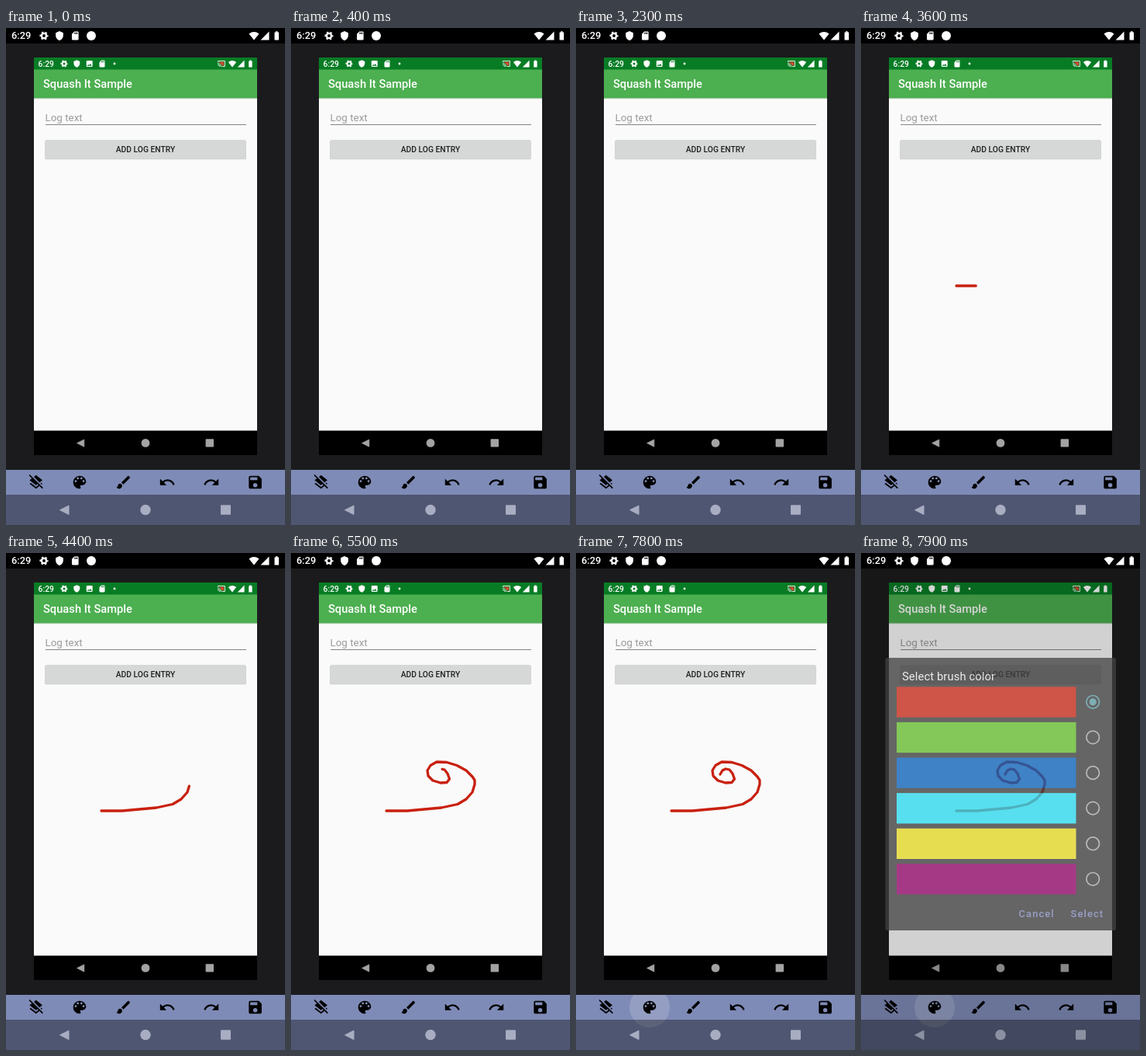
Recreate the animation shown at these times as an HTML page. Size 360 by 640 pixels, loop 8 s.

```html
<!DOCTYPE html>
<html lang="en">
<head>
<meta charset="utf-8">
<title>Drawing on a screenshot</title>
<style>
  html, body { margin: 0; width: 100%; height: 100%; overflow: hidden; background: #000; }
  svg { display: block; width: 360px; height: 640px; font-family: Roboto, "Noto Sans", sans-serif; }
  .medium { font-weight: 500; }
  #dialog .action { font-size: 12.85px; letter-spacing: 1.15px; fill: #878fc4; }
</style>
</head>
<body>
<svg viewBox="0 0 360 640">
  <defs>
    <g id="gear" fill="none" stroke="#fff">
      <circle cx="12" cy="12" r="5.8" stroke-width="4.6"/>
      <circle cx="12" cy="12" r="8.8" stroke-width="3" pathLength="12" stroke-dasharray="1" stroke-dashoffset=".5"/>
    </g>
    <path id="shield" d="M12 1L3 5v6c0 5.55 3.84 10.74 9 12 5.16-1.26 9-6.45 9-12V5z"/>
    <path id="card" d="M18 2h-8L4 8v12c0 1.1.9 2 2 2h12c1.1 0 2-.9 2-2V4c0-1.1-.9-2-2-2zm-6 6h-2V4h2zm3 0h-2V4h2zm3 0h-2V4h2z"/>
    <path id="image" d="M21 19V5c0-1.1-.9-2-2-2H5c-1.1 0-2 .9-2 2v14c0 1.1.9 2 2 2h14c1.1 0 2-.9 2-2zM8.500 13.500l2.500 3L14.500 12l4.500 6H5z"/>
    <g id="cast" fill="none" stroke="#fff" stroke-width="2">
      <path d="M2 8V4h20v16h-8M1 15a6 6 0 0 1 6 6M1 11a10 10 0 0 1 10 10"/>
      <path d="M5 7h14v10h-5.600A13 13 0 0 0 5 8.600z" fill="#e0452f" stroke="none"/>
    </g>

    <path id="clear" d="M19.810 14.990l1.190-.92-1.430-1.430-1.190.92zm-.45-4.720L21 9l-9-7-2.910 2.270 7.870 7.880zM3.270 1L2 2.270l4.220 4.220L3 9l1.630 1.270L12 16l2.100-1.630 1.430 1.430L12 18.540l-7.370-5.730L3 14.070l9 7 4.950-3.850L20.730 21 22 19.730z"/>
    <g id="palette">
      <path d="M12 3c-4.970 0-9 4.030-9 9s4.030 9 9 9c.83 0 1.500-.67 1.500-1.500 0-.39-.15-.74-.39-1-.23-.26-.38-.61-.38-1 0-.83.67-1.500 1.500-1.500H16c2.760 0 5-2.240 5-5 0-4.420-4.030-8-9-8z"/>
      <g fill="#8591ba">
        <circle cx="6.5" cy="10.5" r="1.5"/><circle cx="9.500" cy="6.5" r="1.5"/>
        <circle cx="14.5" cy="6.5" r="1.5"/><circle cx="17.5" cy="10.5" r="1.5"/>
      </g>
    </g>
    <path id="brush" d="M7 14c-1.660 0-3 1.340-3 3 0 1.310-1.160 2-2 2 .92 1.220 2.490 2 4 2 2.210 0 4-1.790 4-4 0-1.660-1.340-3-3-3zm13.710-9.370l-1.340-1.340c-.39-.39-1.020-.39-1.410 0L9 12.250 11.750 15l8.960-8.960c.39-.39.39-1.020 0-1.410z"/>
    <path id="undo" d="M12.500 8c-2.650 0-5.050.99-6.900 2.600L2 7v9h9l-3.620-3.620c1.390-1.160 3.160-1.880 5.120-1.880 3.540 0 6.550 2.310 7.600 5.500l2.370-.78C21.080 11.030 17.150 8 12.500 8z"/>
    <use id="redo" href="#undo" transform="matrix(-1 0 0 1 24 0)"/>
    <path id="save" d="M17 3H5c-1.110 0-2 .9-2 2v14c0 1.100.89 2 2 2h14c1.100 0 2-.9 2-2V7zm-5 16a3 3 0 1 1 0-6 3 3 0 0 1 0 6zm3-10H5V5h10z"/>

    <g id="status" fill="#fff">
      <text class="medium" x="7" y="14.4" font-size="12.85">6:29</text>
      <path d="M313.500 7.500Q320 2.600 326.500 7.500L320 15.500zM339.500 4.500v11h-11zM346.500 5.500h1.500v-1.200h2.500v1.200h1.500v10h-5.500z"/>
    </g>
    <g id="keys">
      <path d="M81 615v11.500L69.500 620.700z" stroke="currentColor" stroke-linejoin="round"/>
      <circle cx="180" cy="620.5" r="6.700"/>
      <rect x="277" y="614.2" width="13" height="12.600" rx="1"/>
    </g>
    <clipPath id="below"><rect y="569" width="360" height="71"/></clipPath>
  </defs>

  <rect y="20" width="360" height="549" fill="#1b1b1d"/>

  <rect x="36" y="38" width="288" height="512" fill="#fafafa"/>
  <rect x="36" y="38" width="288" height="16" fill="#087c25"/>
  <rect x="36" y="53.500" width="288" height="37" fill="#4caf50"/>
  <rect x="36" y="90.500" width="288" height="1" fill="#000" opacity=".1"/>
  <rect x="36" y="518.500" width="288" height="31.500" fill="#000"/>
  <g transform="translate(36 38) scale(.8)">
    <use href="#status"/>
    <use href="#keys" fill="#a3a3a3" color="#a3a3a3"/>
  </g>
  <circle cx="140" cy="46" r="1.4" fill="#fff"/>
  <text class="medium" x="48" y="77.300" font-size="14.7" fill="#fff">Squash It Sample</text>
  <text x="50.500" y="119.600" font-size="13.4" fill="#9b9b9b">Log text</text>
  <rect x="51" y="124" width="259" height="1" fill="#858585"/>
  <rect x="50" y="145" width="260" height="24.300" rx="1.5" fill="#000" opacity=".16"/>
  <rect x="50.500" y="144" width="259" height="24" rx="1.5" fill="#d6d7d7"/>
  <text class="medium" x="180" y="160" font-size="10.3" text-anchor="middle" fill="#212121">ADD LOG ENTRY</text>

  <path id="stroke" pathLength="1" stroke-dasharray="1 2" fill="none" stroke="#c9200f" stroke-width="3.3"
    stroke-linecap="round" stroke-linejoin="round"
    d="M123 332H150L172 330 194 328 215 323.500 226 317 234 308 237 298V292.500L234 288 226 280 214 273.500 201 269.500 188 269 180 273.500 176 280 177 287 183 293 193 296 201 295.500 204.500 291 202 284 198 279 193 278 189 280 186 285"/>

  <rect y="569" width="360" height="71" fill="#7f8bb7"/>
  <circle id="ripple" cx="95" cy="585" fill="#fff" clip-path="url(#below)"/>
  <rect y="601" width="360" height="39" fill="#000" opacity=".38"/>
  <use href="#keys" fill="#a8adc2" color="#a8adc2"/>
  <g id="icons"></g>

  <g id="dialog">
    <rect width="360" height="640" opacity=".165"/>
    <g opacity=".75">
      <rect x="31.500" y="135" width="297.500" height="351" rx="3" fill="#424242"/>
      <text x="53" y="164.300" font-size="14.7" letter-spacing=".14" fill="#fff">Select brush color</text>
      <g id="choices"></g>
      <text class="action medium" x="203.500" y="468.500">Cancel</text>
      <text class="action medium" x="270.500" y="468.500">Select</text>
    </g>
  </g>
  <use href="#status"/>
  <g id="top"></g>
</svg>
<script>
  const $ = id => document.getElementById(id);
  const icon = (name, x, y, scale, fill) =>
    `<use href="#${name}" fill="${fill}" transform="translate(${x} ${y}) scale(${scale}) translate(-12 -12)"/>`;
  const row = (names, xs, y, scale, fill) =>
    names.map((name, i) => icon(name, xs[i], y, scale, fill)).join('');

  const tools = ['clear', 'palette', 'brush', 'undo', 'redo', 'save'];
  $('icons').innerHTML = row(tools, [38.7, 95, 151.7, 208, 265, 321.6], 585, .92, '#000');
  $('stroke').insertAdjacentHTML('beforebegin',
    row(['gear', 'shield', 'image', 'card', 'cast'], [75, 91.3, 107.7, 124, 278], 46, .44, '#fff'));
  $('top').innerHTML = row(['gear', 'shield', 'card'], [49, 69, 89.3], 10, .54, '#fff') +
    '<circle cx="110" cy="10" r="6" fill="#fff"/>';

  const colors = ['#cd2c19', '#69c531', '#0f68c1', '#2fe4f9', '#efe127', '#97076d'];
  $('choices').innerHTML = colors.map((color, i) => {
    const y = 172.3 + 45.6 * i, tint = i ? '#b2b2b2' : '#63a4ab';
    return `<rect x="46" y="${y}" width="231.5" height="39.3" fill="${color}"/>
      <circle cx="299.2" cy="${y + 19.5}" r="8.3" fill="none" stroke="${tint}" stroke-width="1.7"/>` +
      (i ? '' : `<circle cx="299.2" cy="${y + 19.5}" r="4.6" fill="${tint}"/>`);
  }).join('');

  const LOOP = 8000, DRAW = [3400, 5600], TAP = 7600, OPEN = 7900;
  const progress = (t, from, to) => Math.min(1, Math.max(0, (t - from) / (to - from)));
  const show = (id, on) => $(id).setAttribute('visibility', on ? 'visible' : 'hidden');

  function draw(t) {
    const drawn = progress(t, ...DRAW), tap = progress(t, TAP, TAP + 200);
    show('stroke', drawn > 0);
    $('stroke').setAttribute('stroke-dashoffset', 1 - drawn);
    $('ripple').setAttribute('r', 26 * tap);
    $('ripple').setAttribute('opacity', .16 * tap);
    show('dialog', t >= OPEN);
  }

  const start = performance.now();
  function tick() {
    draw((performance.now() - start) % LOOP);
    requestAnimationFrame(tick);
  }
  tick();
</script>
</body>
</html>
```
